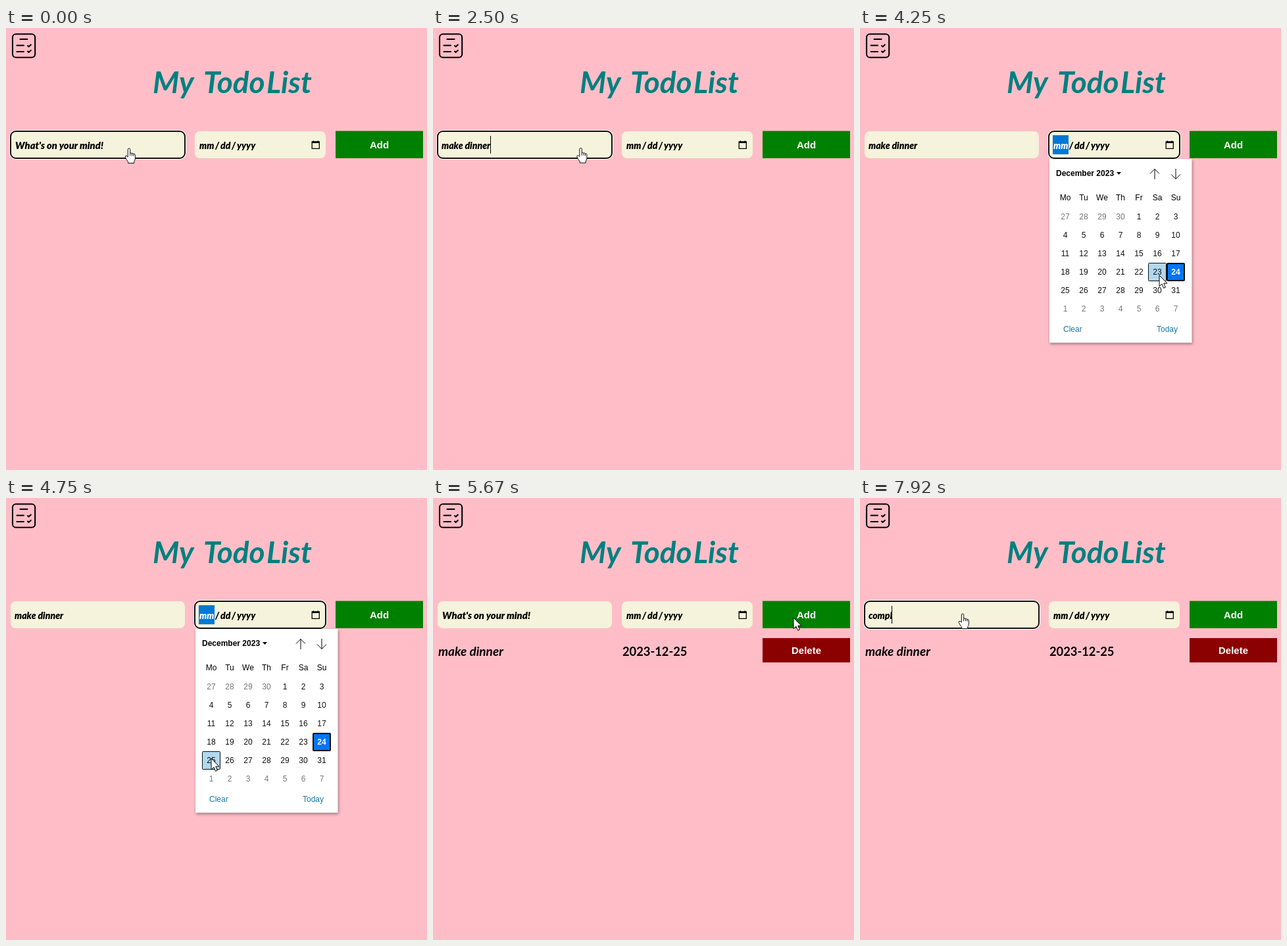
Animation, 640 px wide and 672 px high, one loop 8000 ms. Source, as an HTML page:

```html
<!DOCTYPE html>
<html lang="en">
<head>
<meta charset="utf-8">
<title>My Todo List</title>
<style>
  html, body { margin: 0; width: 100%; height: 100%; overflow: hidden; background: #ffbec7; }
  svg { display: block; width: 640px; height: 672px; }
  text { white-space: pre; }
  .script { font: italic 900 14px Lato, "Open Sans", sans-serif; }
  .hint { font-size: 14.8px; }
  .digits { font-style: normal; }
  .title { font-size: 46px; font-weight: bold; fill: #008080; }
  .row { font-size: 19px; font-weight: bold; }
  .row.digits { font-size: 18.3px; }
  .ui { font: 12px "Liberation Sans", Arial, sans-serif; }
  .btn { font-weight: bold; font-size: 15px; fill: #fff; text-anchor: middle; }
  .day { text-anchor: middle; }
  .line { fill: none; stroke: #000; }
  .drop { filter: drop-shadow(1px 2px 2px rgba(0, 0, 0, .4)); }
</style>
</head>
<body>
<svg viewBox="0 0 640 672">
  <rect width="640" height="672" fill="#ffbec7"/>
  <g class="line" stroke-width="2.1" stroke-linecap="round" stroke-linejoin="round">
    <rect x="10" y="9.3" width="34.2" height="35.4" rx="5"/>
    <path d="M21.5 17H32.5M16.5 26.5H27M16.5 36H27M33 27L34.6 28.4L37.8 25.4M33 35.5L34.6 36.9L37.8 33.9"/>
  </g>
  <text class="script title" y="99"><tspan x="223">My</tspan> <tspan x="300">Todo</tspan> <tspan x="396">List</tspan></text>

  <g fill="#f5f3db">
    <rect x="7" y="157" width="265" height="41" rx="8"/>
    <rect x="287" y="157" width="199" height="41" rx="8"/>
  </g>
  <g id="ring" fill="none">
    <rect y="157" height="41" rx="8" stroke="#fff" stroke-width="4"/>
    <rect y="157" height="41" rx="8" fill="#f5f3db" stroke="#101010" stroke-width="2"/>
  </g>
  <text id="task" y="184"></text>
  <path id="caret" class="line" d="M0 164V191"/>

  <rect id="mark" x="293" y="163" height="29" fill="#0078d7"/>
  <g id="date"></g>
  <path class="line" stroke-width="1.3" d="M465.2 173H476.3V183.3H465.2Z"/>
  <path d="M465 172.5H476.5V175H465ZM466.8 171.2H468V173H466.8ZM473.5 171.2H474.7V173H473.5Z"/>

  <rect x="501" y="156.5" width="133" height="41.5" fill="#008000"/>
  <text class="ui btn" x="567.5" y="183">Add</text>
  <g id="item">
    <text class="script row" x="8" y="240">make dinner</text>
    <text class="script row digits" x="288" y="240">2023-12-25</text>
    <rect x="501" y="213" width="133" height="37" fill="#8b0000"/>
    <text class="ui btn" x="567.5" y="237">Delete</text>
  </g>

  <g id="popup" class="ui">
    <rect class="drop" x="288" y="199" width="216.5" height="279.5" fill="#fff"/>
    <text x="298" y="225" font-weight="bold">December 2023</text>
    <path d="M390 219H397L393.5 223Z"/>
    <path class="line" d="M448 230V214.5M441 221.5L448 214.5L455 221.5M480 214V229.5M473 222.5L480 229.5L487 222.5"/>
    <rect id="hover" width="27" height="27" rx="1" fill="#b0d8ee" stroke="#101010"/>
    <rect x="467" y="358" width="26" height="26" rx="1" fill="#0075ff" stroke="#101010" stroke-width="2"/>
    <g id="days"></g>
    <text x="309" y="462" fill="#1677a6">Clear</text>
    <text x="451" y="462" fill="#1677a6">Today</text>
  </g>

  <g id="cursor" fill="#fff" stroke="#000" stroke-linejoin="round">
    <path id="arrow" d="M0 0V17L4 13.2L6.6 19.4L9.3 18.2L6.8 12.2H12Z"/>
    <g id="hand" transform="scale(.94)">
      <path d="M-1.8 13V1.8Q-1.8 0 0 0T1.8 1.8V8Q3 6.6 4.8 8.2Q6.4 7.4 7.4 9Q9.8 8.6 10 11V16Q10 19 8.2 21V24H-1.4V21.8Q-4.2 18.4 -6 14.4Q-6.4 11.6 -4.2 12Q-2.8 12.6 -1.8 14Z"/>
      <path d="M1.8 8V12M4.8 8.5V12M7.4 9.2V12.5" fill="none"/>
    </g>
  </g>
</svg>
<script>
const LOOP = 8000;
const CELL = 28, GRID_X = 298, GRID_Y = 273;
const FOCUS_DATE = 3170, OPEN = 3420, PICK = 4790, ADD = 5590, REFOCUS = 6250;

const typing = [
  { text: "make dinner", keys: [830, 1000, 1170, 1300, 1400, 1580, 1660, 1830, 1910, 2080, 2160] },
  { text: "compl", keys: [7250, 7410, 7580, 7740, 7900] }
];

// time, x, y
const path = [
  [0, 187, 183], [2330, 187, 183], [3080, 474, 179], [3500, 474, 179],
  [4080, 455, 376], [4330, 455, 376], [4670, 312, 396], [4910, 312, 396],
  [5170, 503, 188], [5420, 548, 182], [5690, 548, 182], [6220, 156, 176], [LOOP, 156, 176]
];

const $ = id => document.getElementById(id);
const show = (id, on) => $(id).setAttribute("display", on ? "inline" : "none");
const set = (el, attrs) => { for (const k in attrs) el.setAttribute(k, attrs[k]); };

function addText(parent, attrs, str) {
  const el = document.createElementNS("http://www.w3.org/2000/svg", "text");
  set(el, attrs);
  el.textContent = str;
  parent.append(el);
  return el;
}

function buildDays() {
  const put = (col, y, str, extra) =>
    addText($("days"), { class: "day", x: GRID_X + CELL * (col + .5), y, ...extra }, str);
  ["Mo", "Tu", "We", "Th", "Fr", "Sa", "Su"].forEach((name, col) => put(col, 262, name));
  for (let i = 0; i < 42; i++) {
    const day = i - 3;
    const inside = day > 0 && day <= 31;
    const num = day < 1 ? day + 30 : inside ? day : day - 31;
    const look = day === 24 ? { fill: "#fff", "font-weight": "bold" } : { fill: inside ? "#101010" : "#767676" };
    put(i % 7, 291 + CELL * Math.floor(i / 7), num, look);
  }
}

const blank = { parts: ["mm", "/", "dd", "/", "yyyy"], xs: [294, 318, 326, 343, 351], mark: 24, cls: "script" };
const filled = { parts: ["12", "/", "25", "/", "2023"], xs: [293.5, 310, 318, 336, 344], mark: 16, cls: "script digits" };
const dateParts = blank.parts.map(() => addText($("date"), { y: 184 }, ""));

function drawDate(t) {
  const d = t >= PICK && t < ADD ? filled : blank;
  const focused = t >= FOCUS_DATE && t < ADD;
  dateParts.forEach((el, i) => {
    el.textContent = d.parts[i];
    set(el, { x: d.xs[i], class: d.cls, fill: focused && i === 0 ? "#fff" : "#000" });
  });
  set($("mark"), { width: d.mark });
  show("mark", focused);
}

function drawRing(t) {
  const onTask = t < FOCUS_DATE || t >= REFOCUS;
  const onDate = t >= FOCUS_DATE && t < ADD;
  for (const el of $("ring").children) {
    set(el, onTask ? { x: 7, width: 265 } : { x: 287, width: 199 });
  }
  show("ring", onTask || onDate);
  return onTask;
}

function drawTask(t, focused) {
  const { text, keys } = typing[t < ADD ? 0 : 1];
  const count = keys.filter(k => k <= t).length;
  const task = $("task");
  task.textContent = count ? text.slice(0, count) : "What's on your mind!";
  set(task, count ? { x: 13, class: "script" } : { x: 14, class: "script hint" });
  const idle = count ? t - keys[count - 1] : 0;
  show("caret", focused && count > 0 && idle % 1000 < 500);
  if (count) {
    const x = Math.floor(13 + task.getComputedTextLength()) + .5;
    set($("caret"), { transform: `translate(${x} 0)` });
  }
}

function cursorAt(t) {
  const i = path.findIndex(p => p[0] > t);
  const [t0, x0, y0] = path[i - 1], [t1, x1, y1] = path[i];
  const u = (t - t0) / (t1 - t0), e = u * u * (3 - 2 * u);
  return [x0 + (x1 - x0) * e, y0 + (y1 - y0) * e];
}

function drawCursor(t, open) {
  const [x, y] = cursorAt(t);
  const onField = !open && y > 157 && y < 198 && ((x > 7 && x < 272) || (x > 287 && x < 460));
  set($("cursor"), { transform: `translate(${x.toFixed(2)} ${y.toFixed(2)})` });
  show("hand", onField);
  show("arrow", !onField);

  const col = Math.floor((x - GRID_X) / CELL), row = Math.floor((y - GRID_Y) / CELL);
  show("hover", open && col >= 0 && col < 7 && row >= 0 && row < 6);
  set($("hover"), { x: GRID_X + CELL * col + .5, y: GRID_Y + CELL * row + .5 });
}

function draw(t) {
  const open = t >= OPEN && t < PICK;
  const focused = drawRing(t);
  drawTask(t, focused);
  drawDate(t);
  show("item", t >= ADD);
  show("popup", open);
  drawCursor(t, open);
}

buildDays();
draw(0);
let start;
requestAnimationFrame(function tick(now) {
  start ??= now;
  draw(Math.max(0, now - start) % LOOP);
  requestAnimationFrame(tick);
});
</script>
</body>
</html>
```
